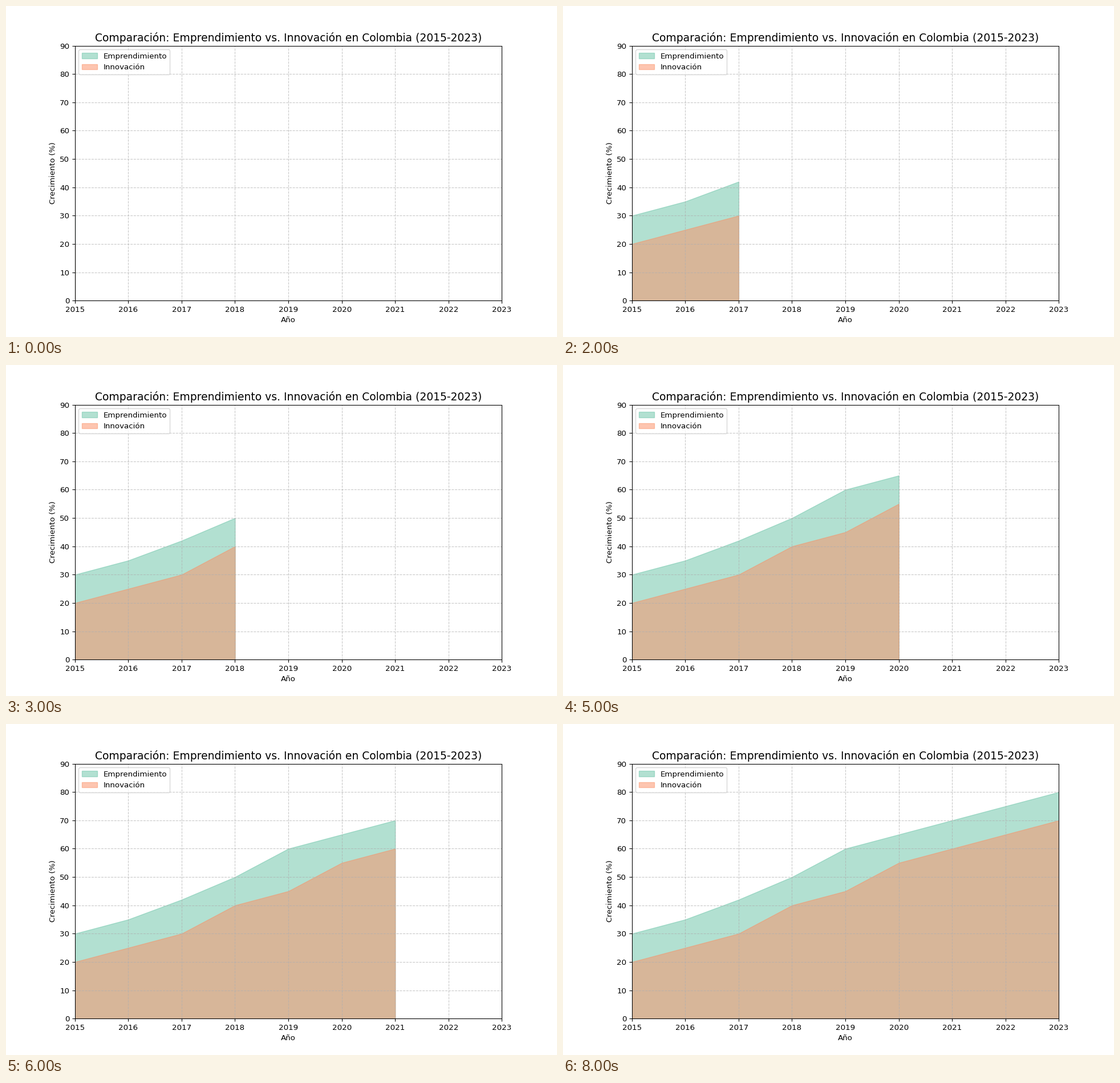
A matplotlib script for the animation above (9000 ms loop, 966 by 580 pixels).

```python
import matplotlib.pyplot as plt
import numpy as np
from matplotlib.animation import FuncAnimation

# 966 x 580 pixels; the height is rounded up so it never truncates to 579
SIZE, DPI = (10, 6.0042), 96.6
YEARS = np.arange(2015, 2024)
SERIES = [
    ("Emprendimiento", "#66c2a5", [30, 35, 42, 50, 60, 65, 70, 75, 80]),
    ("Innovación", "#fc8d62", [20, 25, 30, 40, 45, 55, 60, 65, 70]),
]

plt.rcParams["font.family"] = "DejaVu Sans"
fig, ax = plt.subplots(figsize=SIZE, dpi=DPI)


def draw(step):
    """Show both areas from the first year up to the given step."""
    ax.clear()
    n = step + 1
    for label, color, values in SERIES:
        ax.fill_between(YEARS[:n], values[:n], color=color, alpha=0.5, label=label)
    ax.set_xlim(YEARS[0], YEARS[-1])
    ax.set_ylim(0, 90)
    ax.set_xticks(YEARS)
    ax.set_title("Comparación: Emprendimiento vs. Innovación en Colombia (2015-2023)",
                 fontsize=14)
    ax.set_xlabel("Año")
    ax.set_ylabel("Crecimiento (%)")
    ax.grid(True, linestyle="--", alpha=0.7)
    ax.legend(loc="upper left")


anim = FuncAnimation(fig, draw, frames=len(YEARS), init_func=lambda: draw(0),
                     interval=1000, repeat=True, repeat_delay=0)
plt.show()
```
